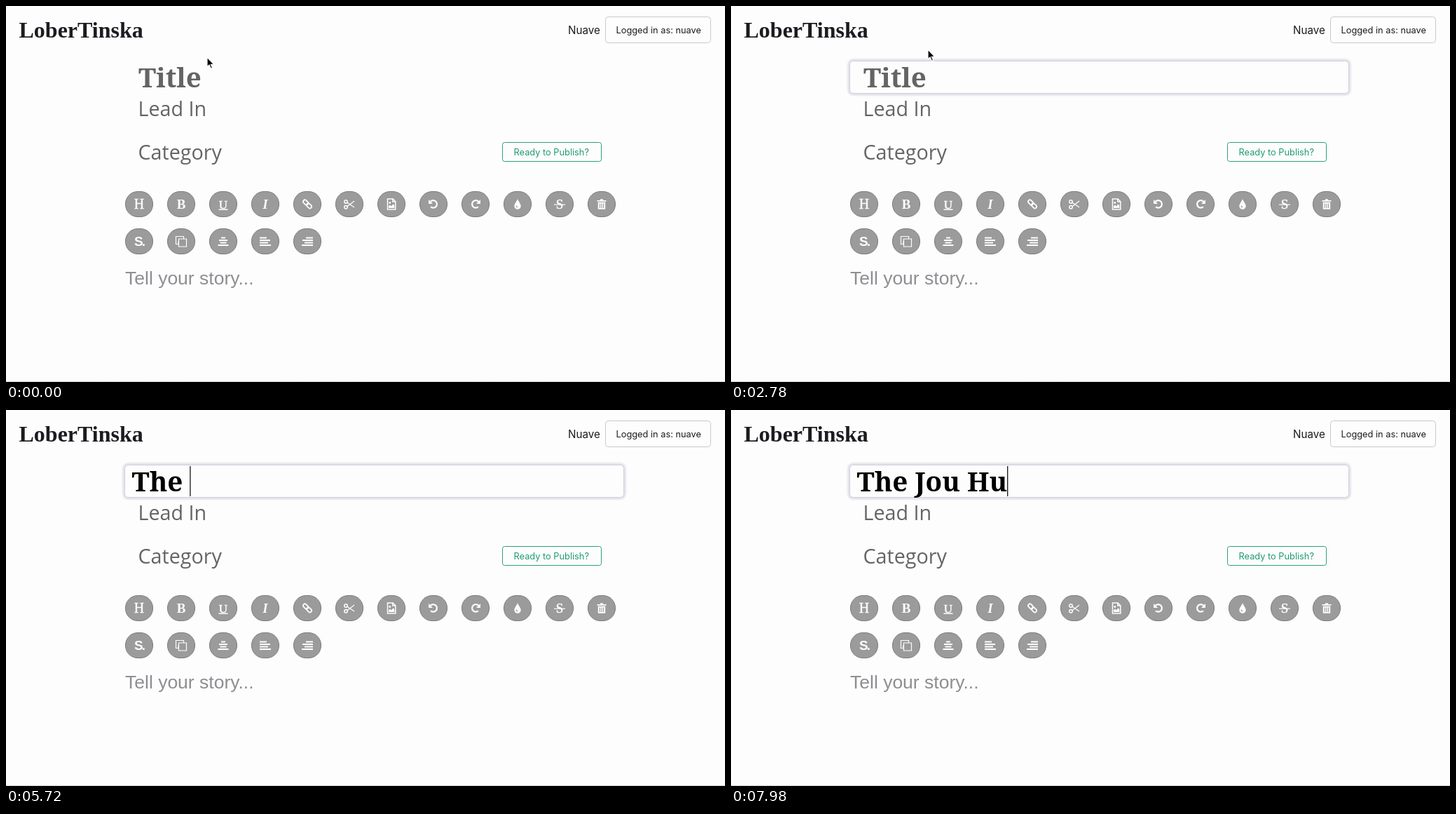
These frames come from a looping animation (1026 by 536 pixels, 8000 ms). An HTML page:

```html
<!DOCTYPE html>
<html lang="en">
<head>
<meta charset="utf-8">
<title>Story editor</title>
<style>
  html, body { margin: 0; width: 100%; height: 100%; overflow: hidden; background: #fdfdfd; }
  svg { display: block; }
  text { white-space: pre; }
  .ui { font-family: Inter, sans-serif; font-size: 12.8px; fill: #1c1c1e; }
  .logo { font: bold 32px "Liberation Serif", serif; fill: #1b1b20; }
  .heading { font: bold 38.5px "Noto Serif", serif; }
  .field { font: 500 28.7px "Open Sans", sans-serif; }
  .hint { fill: #646464; }
  .story { font: 26.5px "Liberation Sans", sans-serif; fill: #8e8e92; }
  .serif { font: bold 19px "Liberation Serif", serif; text-anchor: middle; }
  .pill { fill: #9b9b9b; stroke: #7d7d7d; }
  .icon { fill: #fdfdfd; }
  .light { font-weight: 400; stroke: #fdfdfd; stroke-width: .5; }
  .line { fill: none; stroke: #fdfdfd; stroke-width: 1.5; }

  #focus { animation: focus 8s linear infinite; }
  #mouse { animation: move 8s ease-in-out infinite; }
  #arrow { animation: arrow 8s step-end infinite; }
  #beam { animation: beam 8s step-end infinite; }

  @keyframes focus {
    0%, 10.5% { opacity: 0; }
    12.4%, 100% { opacity: 1; }
  }
  @keyframes move {
    0%, .25% { transform: translate(287px, 73px); }
    10.25%, 26.25% { transform: translate(267px, 95px); }
    34.75%, 36.5% { transform: translate(281px, 62px); }
    45.75%, 100% { transform: translate(285px, 49px); }
  }
  @keyframes arrow {
    0% { opacity: 1; }
    4.5% { opacity: 0; }
    30.4% { opacity: 1; }
    53.25%, 100% { opacity: 0; }
  }
  @keyframes beam {
    0% { opacity: 0; }
    4.5% { opacity: 1; }
    30.4%, 100% { opacity: 0; }
  }
</style>
</head>
<body>
<svg width="1026" height="536" viewBox="0 0 1026 536">
  <defs>
    <filter id="soft" x="-5%" y="-30%" width="110%" height="160%"><feGaussianBlur stdDeviation="1.2"/></filter>
    <path id="ibeam" d="M-3-7.5Q0-7.5 0-5.5Q0-7.5 3-7.5M0-6V6M-3 7.5Q0 7.5 0 5.5Q0 7.5 3 7.5M-1.8 2.5H1.8"/>
  </defs>

  <text class="logo" x="18.5" y="44.5">LoberTinska</text>
  <text class="ui" x="802" y="40" style="font-size:15.2px">Nuave</text>
  <rect x="855.5" y="15.5" width="150" height="37" rx="4" fill="none" stroke="#c9c9c9"/>
  <text class="ui" x="870.5" y="39">Logged in as: nuave</text>

  <g id="focus">
    <rect x="168.5" y="77.5" width="714" height="48" rx="6" fill="none" stroke="#dfdfe8" stroke-width="4" filter="url(#soft)"/>
    <rect x="169.5" y="78.5" width="712" height="46" rx="5" fill="#fdfdfd" stroke="#d2d2dc"/>
  </g>
  <text id="title" class="heading hint" x="189" y="116">Title</text>
  <text id="typed" class="heading" x="179.5" y="116"></text>
  <rect id="caret" y="80" width="1.2" height="43"/>

  <text class="field hint" x="188.5" y="157">Lead In</text>
  <text class="field hint" x="188.5" y="219">Category</text>
  <rect x="708.5" y="194.5" width="141" height="27" rx="3" fill="none" stroke="#2ba077"/>
  <text class="ui" x="724.5" y="213" style="fill:#1f9c6e">Ready to Publish?</text>

  <g id="tools"></g>
  <text class="story" x="170" y="397">Tell your story...</text>
  <path d="M0 535.5H1026" stroke="#a6a6a6" stroke-dasharray="1 1"/>

  <g id="mouse">
    <path id="arrow" d="M0 0V13.8L3.1 11L5.4 16.2L7.6 15.2L5.4 10.3H9.8Z" stroke="#fff" stroke-width="1.2"/>
    <g id="beam" fill="none">
      <use href="#ibeam" stroke="#fff" stroke-width="2.4"/>
      <use href="#ibeam" stroke="#000" stroke-width="1.1"/>
    </g>
  </g>
</svg>
<script>
  const $ = id => document.getElementById(id);
  const glyph = (s, style = '', cls = '') => `<text class="icon serif ${cls}" y="6.5" style="${style}">${s}</text>`;
  const line = (d, extra = '') => `<path class="line" d="${d}" ${extra}/>`;
  const solid = (d, extra = '') => `<path class="icon" d="${d}" ${extra}/>`;
  // Four text bars of given widths; side is -1 left, 0 centre, 1 right.
  const bars = (widths, side) => widths.map((w, i) => {
    const x = side < 0 ? -8 : side > 0 ? 8 - w : -w / 2;
    return `<rect class="icon" x="${x}" y="${-6 + i * 3.5}" width="${w}" height="2"/>`;
  }).join('');
  const turn = line('M-4.5-3.5A5.3 5.3 0 1 1-4 3.8', 'style="stroke-width:2.2"') + solid('M-7-6.5V-.5H-1Z');

  const icons = [
    glyph('H', 'font-size:20px', 'light'),
    glyph('B'),
    glyph('U', 'font-size:17px', 'light') + line('M-6.5 7.7H6.5'),
    glyph('I', 'font-style:italic'),
    `<g transform="rotate(45)">
      <rect class="line" x="-7.5" y="-2.6" width="8" height="5" rx="2.5" style="stroke-width:1.8"/>
      <rect class="line" x="-.5" y="-2.6" width="8" height="5" rx="2.5" style="stroke-width:1.8"/></g>`,
    line('M-3.4-2.5L7 4.5M-3.4 3.5L7-4.5', 'style="stroke-width:1.3"') +
      '<circle class="line" cx="-5" cy="-3.5" r="2.2"/><circle class="line" cx="-5" cy="4.3" r="2.2"/>',
    line('M-5.5-7.5H2L5.8-3.7V7.5H-5.5ZM1.8-7.2V-3.5H5.5') +
      solid('M-4 5.5V3L-2 1L0 3L2.5-.2L4.3 2V5.5Z') + '<circle class="icon" cx="-2.2" cy="-2" r="1.4"/>',
    turn,
    `<g transform="scale(-1 1)">${turn}</g>`,
    solid('M0-7.5C1-4 4.7-.7 4.7 2.7A4.7 4.7 0 0 1-4.7 2.7C-4.7-.7-1-4 0-7.5Z') +
      '<path class="pill" style="stroke:none" d="M-2.5 2.2Q-2.5 4.5 0 5V3.5Q-1.1 3.5-1.1 2.2Z"/>',
    glyph('S', '', 'light') + line('M-8 .7H8', 'style="stroke-width:1.2"'),
    solid('M-6.5-5.5H-2.5L-1.5-7.3H1.5L2.5-5.5H6.5V-3.8H-6.5ZM-5.2-2.8H5.2V7.3H-5.2Z') +
      '<path d="M-2.6-1V5.5M0-1V5.5M2.6-1V5.5" stroke="#9b9b9b" stroke-width="1.1"/>',
    glyph('S.', 'font-family:\'Liberation Sans\',sans-serif;letter-spacing:-2px', 'strong'),
    line('M-3.5-3.5H7.5V7.5H-3.5ZM-4-.5V4H-7.5V-7H3.5V-4', 'style="stroke-width:1.2"'),
    bars([6, 12, 9, 15], 0),
    bars([10, 15, 12, 16], -1),
    bars([10, 15, 12, 16], 1)
  ];
  $('tools').innerHTML = icons.map((icon, i) => {
    const x = 190 + i % 12 * 60, y = i < 12 ? 282.5 : 335.5;
    return `<g transform="translate(${x} ${y})">
      <rect class="pill" x="-19.5" y="-18" width="39" height="36" rx="17.5"/>${icon}</g>`;
  }).join('');

  const phrase = 'The Jou Hu';
  const keys = [4270, 4900, 5220, 5640, 6000, 6340, 6640, 6960, 7380, 7760];
  const focusAt = 860, blinkFrom = 1280, half = 500;

  function draw(now) {
    const t = now % 8000;
    const count = keys.filter(k => t >= k).length;
    const since = t - (count ? keys[count - 1] : blinkFrom);
    const text = phrase.slice(0, count), typed = $('typed');
    if (typed.textContent !== text) typed.textContent = text;
    $('title').style.opacity = count ? 0 : 1;
    $('caret').setAttribute('x', count ? 179.5 + typed.getComputedTextLength() : 180);
    $('caret').style.opacity = t >= focusAt && (since < 0 || Math.floor(since / half) % 2 === 0) ? 1 : 0;
  }
  function tick() {
    draw(performance.now());
    requestAnimationFrame(tick);
  }
  tick();
</script>
</body>
</html>
```
